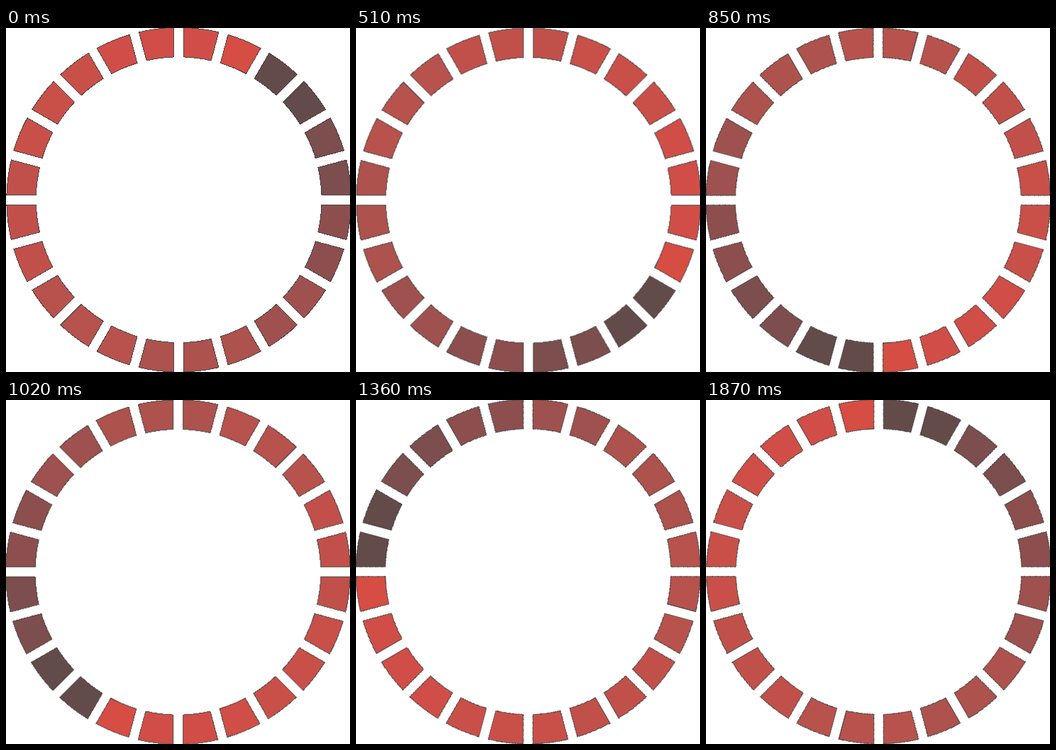
These frames come from a looping animation (485x485 px, 2.04 s). An HTML page:

```html
<!DOCTYPE html>
<html lang="en">
<head>
<meta charset="utf-8">
<title>Segmented ring loader</title>
<style>
  html, body { margin: 0; width: 100%; height: 100%; overflow: hidden; background: #fff; }
  svg { display: block; width: 100%; height: 100%; }
  /* The pivot sits slightly off the ring's centre, giving a faint wobble */
  #ring {
    stroke: #4c4645;
    stroke-width: 1;
    stroke-linejoin: round;
    shape-rendering: crispEdges;
    transform-origin: 243.1px 242.4px;
    animation: spin 2040ms steps(12, end) infinite;
  }
  @keyframes spin { to { transform: rotate(360deg); } }
</style>
</head>
<body>
<svg viewBox="0 0 485 485"><g id="ring"></g></svg>
<script>
  const CX = 243.7, CY = 242.2, OUTER = 242.9, INNER = 201.4, HALF_GAP = 6.8;
  const COUNT = 24, HEAD = 1;
  const shades = ['#d64d43', '#d04e47', '#c95049', '#c2504a', '#b8524d',
                  '#ad524d', '#9e514e', '#8c4f4e', '#7c4e4d', '#634b4a'];

  // Bands of three segments behind the head, then pairs towards the tail
  const shade = d => shades[d < 16 ? Math.ceil(d / 3) : 6 + Math.floor((d - 16) / 2)];

  const point = (r, a) =>
    (CX + r * Math.sin(a)).toFixed(2) + ' ' + (CY - r * Math.cos(a)).toFixed(2);

  // Side edges run parallel to the radii, so the gaps keep one width
  function segment(i) {
    const from = i * 2 * Math.PI / COUNT, to = (i + 1) * 2 * Math.PI / COUNT;
    const o = Math.asin(HALF_GAP / OUTER), n = Math.asin(HALF_GAP / INNER);
    return `M${point(OUTER, from + o)}A${OUTER} ${OUTER} 0 0 1 ${point(OUTER, to - o)}` +
           `L${point(INNER, to - n)}A${INNER} ${INNER} 0 0 0 ${point(INNER, from + n)}Z`;
  }

  const ring = document.getElementById('ring');
  for (let i = 0; i < COUNT; i++) {
    const path = document.createElementNS('http://www.w3.org/2000/svg', 'path');
    path.setAttribute('d', segment(i));
    path.setAttribute('fill', shade((HEAD - i + COUNT) % COUNT));
    ring.append(path);
  }
</script>
</body>
</html>
```
